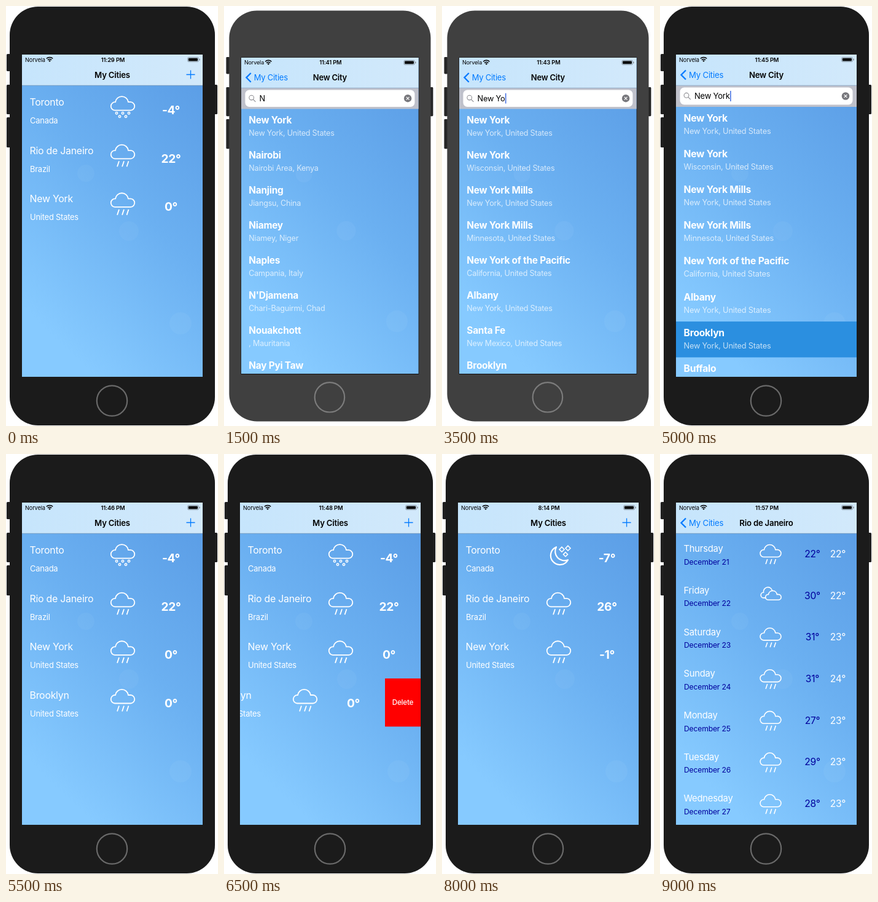
An HTML page that plays this animation: 345 px wide and 683 px high, repeating every 10000 ms.

```html
<!DOCTYPE html>
<html lang="en">
<head>
<meta charset="utf-8">
<title>Weather app demo</title>
<style>
  html, body { margin: 0; width: 100%; height: 100%; overflow: hidden; background: #fff; }
  svg { display: block; }
  text { font-family: Inter, sans-serif; letter-spacing: -.016em; white-space: pre; }
</style>
</head>
<body>
<svg width="345" height="683" viewBox="0 0 345 683">
  <defs>
    <linearGradient id="sky" x1=".95" y1="0" x2=".4" y2="1">
      <stop offset="0" stop-color="#5a9ce5"/>
      <stop offset=".5" stop-color="#6bb0f1"/>
      <stop offset="1" stop-color="#86caff"/>
    </linearGradient>
    <linearGradient id="bar">
      <stop offset="0" stop-color="#c6e5fc"/>
      <stop offset="1" stop-color="#d2e9fb"/>
    </linearGradient>
    <clipPath id="screen"><path d="M26 79h294v524h-294z"/></clipPath>
  </defs>
  <g id="stage"></g>
</svg>
<script>
const BLUE = '#007aff', NAVY = '#00009c', ROW = 78.6;
const stage = document.getElementById('stage');

const rect = (x, y, w, h, fill, r = 0, extra = '') =>
  `<rect x="${x}" y="${y}" width="${w}" height="${h}" rx="${r}" fill="${fill}" ${extra}/>`;
const circle = (x, y, r, attrs) => `<circle cx="${x}" cy="${y}" r="${r}" ${attrs}/>`;
const line = (d, color, width = 1.5, extra = '') =>
  `<path d="${d}" fill="none" stroke="${color}" stroke-width="${width}" ${extra}/>`;
const text = (x, y, str, size, fill = '#fff', weight = 400, anchor = 'start', extra = '') =>
  `<text x="${x}" y="${y}" font-size="${size}" fill="${fill}" font-weight="${weight}" text-anchor="${anchor}" ${extra}>${str}</text>`;
const move = (x, y, body, scale = 1) => `<g transform="translate(${x} ${y}) scale(${scale})">${body}</g>`;

// Weather icons, centred on x = 0 with their top at y = 0
const cloudPath = 'M-13 22.5a6.75 6.75 0 0 1 1-13.5a10.6 10.6 0 0 1 21 0h3a6.75 6.75 0 0 1 1 13.5z';
const cloud = line(cloudPath, '#fff', 1.8);
const diamond = (x, y, r) => line(`M${x} ${y - r}l${r} ${r}l${-r} ${r}l${-r} ${-r}z`, '#fff', 1.6);
const icons = {
  rain: cloud + line('M-6 26.5l-3 9M2 26.5l-3 9M9.5 26.5l-3 9', '#fff', 1.8),
  snow: cloud + [[-10, 27], [0, 27], [10, 27], [-5, 32.5], [5, 32.5]]
    .map(([x, y]) => circle(x, y, 1.7, 'fill="none" stroke="#fff" stroke-width="1.5"')).join(''),
  cloud: move(0, 7, cloud),
  night: line('M-4 4a15 15 0 1 0 19 21a15 15 0 0 1 -19 -21z', '#fff', 2.2, 'stroke-linejoin="round"')
    + diamond(5, 8, 4) + diamond(15, 6, 4) + diamond(11, 16, 3.5),
  cloudy: line('M-9 21h-4a5 5 0 0 1 0-10a8 8 0 0 1 16-3', '#fff', 1.8) + move(5, 8, line(cloudPath, '#fff', 2.4), .75),
};

function phone(screen, small) {
  const body = small ? '#404040' : '#1b1b1b', button = small ? '#262626' : '#1e1e1e';
  const parts = [[1, 78, 28], [1, 128, 48], [1, 181, 49], [338, 128, 48]]
    .map(([x, y, h]) => rect(x, y, 6, h, button, 1.5)).join('')
    + rect(6, 1, 334, 681, body, 46)
    + circle(172.5, 642, 24.7, `fill="none" stroke="${small ? '#7c7c7c' : '#6a6a6a'}" stroke-width="2.2"`)
    + (small ? rect(25.5, 78.5, 295, 525.5, '#111') : '')
    + `<g clip-path="url(#screen)">${rect(26, 79, 294, 524, 'url(#sky)')}`
    + [[130, 272, 14], [200, 366, 16], [284, 516, 18]]
      .map(([x, y, r]) => circle(x, y, r, 'fill="#fff" opacity=".04"')).join('')
    + screen + '</g>';
  return small ? `<g transform="translate(2.5 6.5) scale(.982 .981)">${parts}</g>` : parts;
}

function navBar(time, title, back) {
  const wifi = line('M65.8 85.6a7.2 7.2 0 0 1 10.4 0M67.8 87.8a4.4 4.4 0 0 1 6.4 0', '#000', 1.5)
    + '<path d="M71 91l-1.8-1.9a2.6 2.6 0 0 1 3.6 0z"/>';
  const battery = rect(295.5, 83.5, 18, 7.2, 'none', 2, 'stroke="#000" stroke-opacity=".4" stroke-width=".8"')
    + rect(296.8, 84.7, 15.2, 4.8, '#000', 1) + rect(314.5, 85.8, 1, 2.6, '#777');
  const action = back
    ? line('M42 104.5l-7.5 7.5l7.5 7.5', BLUE, 2.3) + text(47, 117, 'My Cities', 13.2, BLUE)
    : line('M293.5 111.5h14M300.5 104.5v14', BLUE, 1.3);
  return rect(26, 79, 294, 50, 'url(#bar)') + rect(26, 128.8, 294, .7, '#7d98b0')
    + text(31, 90.5, 'Norvela', 9.2, '#000') + wifi + battery
    + text(174, 90.5, time + ' PM', 9.4, '#000', 600, 'middle')
    + text(173, 117, title, 13.2, '#000', 600, 'middle') + action;
}

function cityRow([name, country, icon, temp], i, shift = 0) {
  return move(-shift, 129.2 + i * ROW,
    text(38.5, 33, name, 15.9) + text(39, 62, country, 12.9)
    + move(190, 18, icons[icon]) + text(268.5, 46.8, temp, 19.2, '#fff', 700, 'middle'));
}

function cities(time, rows, { swipe = 0, pressed = -1 } = {}) {
  const last = rows.length - 1, top = 129.2 + last * ROW;
  return (pressed < 0 ? '' : rect(26, 129.2 + pressed * ROW, 294, ROW, '#2b8fe0'))
    + rows.map((row, i) => cityRow(row, i, i === last ? swipe : 0)).join('')
    + (swipe ? rect(320 - swipe, top, swipe, 78.3, '#f00')
      + text(349 - swipe, top + 43.3, 'Delete', 11.6, '#fff', 500, 'middle') : '')
    + navBar(time, 'My Cities');
}

function search(time, query, rows, { caret = true, pressed = -1 } = {}) {
  const list = rows.map(([name, place], i) => move(0, 164 + i * 58.1,
    (i === pressed ? rect(26, .5, 294, 58.3, '#2b8fe0') : '')
    + text(38.5, 24, name, 15.7, '#fff', 700) + text(38.5, 44, place, 12.8, '#fff', 400, 'start', 'opacity=".72"'))).join('');
  const clear = circle(302, 146.5, 6.3, 'fill="#77777c"') + line('M299.6 144.1l4.8 4.8M304.4 144.1l-4.8 4.8', '#fff', 1.2);
  return list + navBar(time, 'New City', true)
    + rect(26, 129.4, 294, 34.6, '#bfc1cb') + rect(32.5, 132.5, 281, 28, '#fff', 7)
    + circle(43, 145.3, 3.9, 'fill="none" stroke="#8e8e93" stroke-width="1.1"') + line('M45.8 148.2l4 4', '#8e8e93', 1.2)
    + text(56, 151, query, 13, '#000', 400, 'start', 'id="query"')
    + (query ? clear : '') + (caret ? rect(56, 138, 1.5, 17, '#3f6be0', 0, 'id="caret"') : '');
}

function alertBox(behind, pressed) {
  const label = (x, y, str, size, fill, weight) => text(x, y, str, size, fill, weight, 'middle');
  return behind + rect(26, 79, 294, 524, '#000', 0, 'opacity=".4"')
    + rect(67, 286, 212, 110, '#d6f4fb', 10)
    + (pressed ? '<path d="M173.5 361.5h105.500v24.500a10 10 0 0 1-10 10h-95.500z" fill="#b0e4ec"/>' : '')
    + line('M67 361.3h212M173.3 361.3v34.700', '#9fc3cc', .8)
    + label(173, 314, 'Delete City', 13.2, '#000', 600)
    + label(173, 330, "Do you really want to remove 'Brooklyn", 10.1, '#000')
    + label(173, 342.5, "- United States' from your list?", 10.1, '#000')
    + label(120, 384, 'Cancel', 13.2, BLUE, 600) + label(226, 384, 'Yes', 13.2, BLUE);
}

function forecast() {
  const days = [['Thursday', 22, 22], ['Friday', 30, 22], ['Saturday', 31, 23], ['Sunday', 31, 24],
    ['Monday', 27, 23], ['Tuesday', 29, 23], ['Wednesday', 28, 23]];
  return days.map(([day, high, low], i) => move(0, 129.2 + i * 67.7,
    text(38.5, 30, day, 14.8) + text(39, 50.5, 'December ' + (21 + i), 12.2, NAVY)
    + move(180, 18.5, icons[i === 1 ? 'cloudy' : 'rain'], .88)
    + text(248, 38.7, high + '°', 15.6, NAVY, 400, 'middle') + text(289.5, 38.7, low + '°', 15.6, '#fff', 400, 'middle'))).join('')
    + navBar('11:57', 'Rio de Janeiro', true);
}

const US = ', United States';
const places = str => str.split('|').map(row => row.split('/'));
const startN = places('New York/New York' + US + '|Nairobi/Nairobi Area, Kenya|Nanjing/Jiangsu, China|Niamey/Niamey, Niger'
  + "|Naples/Campania, Italy|N'Djamena/Chari-Baguirmi, Chad|Nouakchott/, Mauritania|Nay Pyi Taw/Mandalay, Myanmar");
const startNe = places('New York/New York' + US + '|New Delhi/Delhi, India|Neijiang/Sichuan, China|Newark/New Jersey' + US
  + '|New Orleans/Louisiana' + US + '|Newcastle/England, United Kingdom|Neiva/Huila, Colombia|Neuss/North Rhine, Germany');
const startNew = places('New York/New York' + US + '|New Delhi/Delhi, India|Newark/New Jersey' + US + '|New Orleans/Louisiana' + US
  + '|Newcastle/England, United Kingdom|New Haven/Connecticut' + US + '|Newport/Wales, United Kingdom|New Bedford/Massachusetts' + US);
const yorks = places(`New York/New York${US}|New York/Wisconsin${US}|New York Mills/New York${US}|New York Mills/Minnesota${US}`
  + `|New York of the Pacific/California${US}|Albany/New York${US}`);
const [santaFe, brooklyn, buffalo] = places(`Santa Fe/New Mexico${US}|Brooklyn/New York${US}|Buffalo/New York${US}`);
const early = [...yorks, santaFe, brooklyn], final = [...yorks, brooklyn, buffalo];

const cityList = (toronto, sky, rio, york, brook, brookSky) => [
  ['Toronto', 'Canada', sky, toronto], ['Rio de Janeiro', 'Brazil', 'rain', rio],
  ['New York', 'United States', 'rain', york], ['Brooklyn', 'United States', brookSky, brook]];
const day = cityList('-4°', 'snow', '22°', '0°', '0°', 'rain');
const night = cityList('-7°', 'night', '26°', '-1°', '-1°', 'cloud');
const firstThree = day.slice(0, 3);

// [start time in ms, screen, smaller phone]
const scenes = [
  [0, cities('11:29', firstThree)],
  [500, search('11:40', '', [])],
  [1500, search('11:41', 'N', startN, { caret: false }), true],
  [2000, search('11:42', 'Ne', startNe), true],
  [2500, search('11:42', 'New', startNew), true],
  [3000, search('11:43', 'New Y', early), true],
  [3500, search('11:43', 'New Yo', early), true],
  [4000, search('11:44', 'New Yor', final), true],
  [4500, search('11:44', 'New York', final), true],
  [5000, search('11:45', 'New York', final, { pressed: 6 })],
  [5500, cities('11:46', day)],
  [6000, cities('11:48', day, { swipe: 29 })],
  [6500, cities('11:48', day, { swipe: 58 })],
  [7000, alertBox(cities('8:14', night))],
  [7500, alertBox(cities('8:14', night), true)],
  [8000, cities('8:14', night.slice(0, 3))],
  [8500, cities('11:57', firstThree, { pressed: 1 })],
  [9000, forecast()],
];

let shown;
function draw() {
  const time = performance.now() % 10000;
  const scene = scenes.findLast(([start]) => start <= time);
  if (scene !== shown) {
    shown = scene;
    stage.innerHTML = phone(scene[1], scene[2]);
    const caret = document.getElementById('caret');
    if (caret) caret.setAttribute('x', 56.5 + document.getElementById('query').getComputedTextLength());
  }
  requestAnimationFrame(draw);
}
draw();
</script>
</body>
</html>
```
